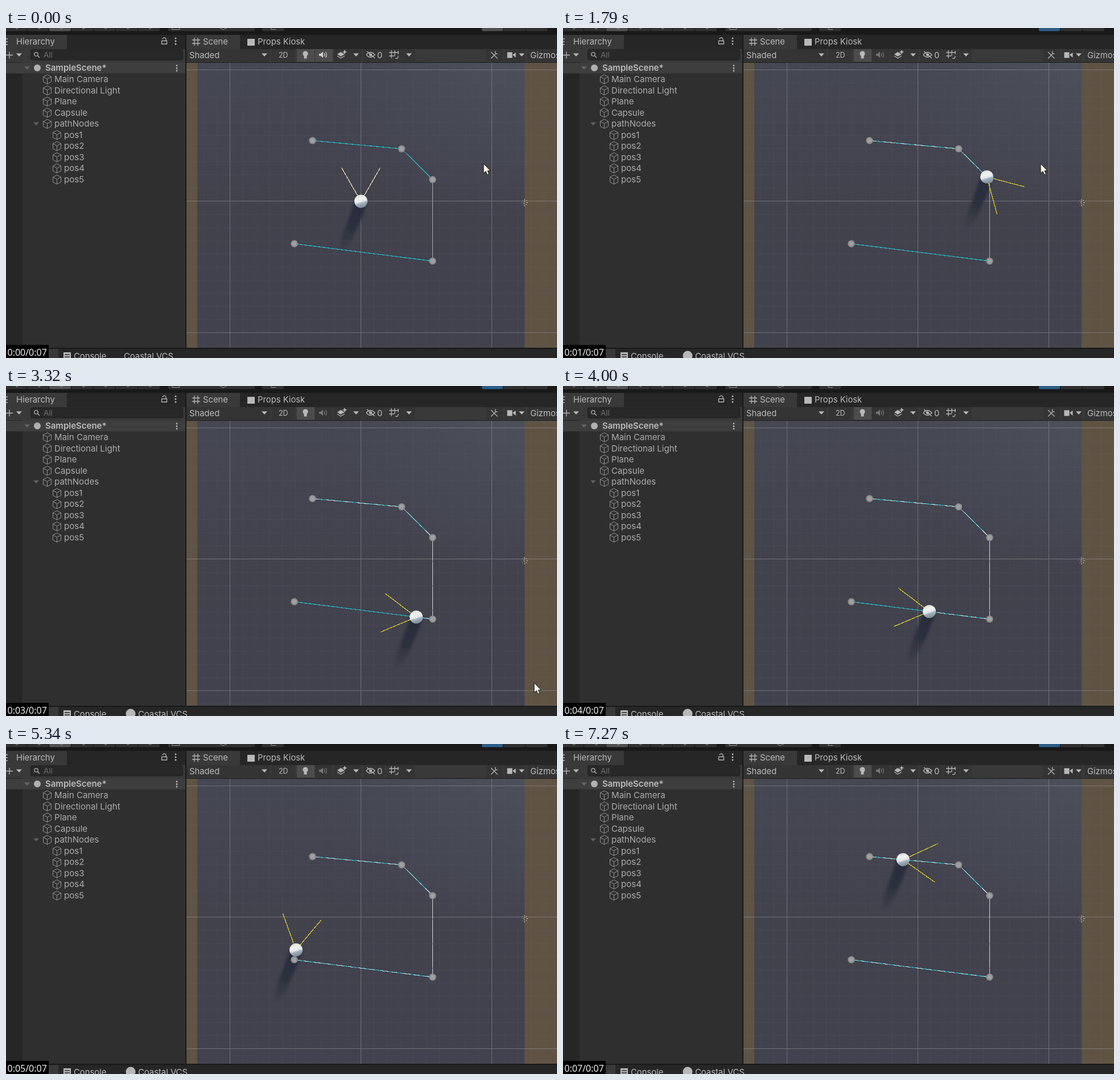
Animation, 968 px wide and 579 px high, one loop 7.33 s. Source, as an HTML page:

```html
<!DOCTYPE html>
<html lang="en">
<head>
<meta charset="utf-8">
<title>Path follower</title>
<style>
html, body { margin: 0; width: 100%; height: 100%; overflow: hidden; background: #191919; }
svg { display: block; }
text { font: 14.8px Inter, "Liberation Sans", sans-serif; fill: #bcbcbc; white-space: pre; }
.timer { font: 16px "Open Sans", "Noto Sans", sans-serif; fill: #fff; }
#tree text { font-size: 15.1px; fill: #acacac; }
.icon { fill: none; stroke: #b4b4b4; stroke-width: 1.3; }
.thin { fill: none; stroke: #929292; stroke-width: 1; }
.solid { fill: #b8b8b8; }
.crisp { shape-rendering: crispEdges; fill: none; }
</style>
</head>
<body>
<svg id="stage" width="968" height="579" viewBox="0 0 968 579">
  <defs>
    <linearGradient id="floor" x1="0" y1="0" x2="0" y2="1">
      <stop offset="0" stop-color="#454752"/>
      <stop offset=".5" stop-color="#42424d"/>
      <stop offset="1" stop-color="#41424d"/>
    </linearGradient>
    <radialGradient id="sheen" cx=".97" cy="0" r=".55">
      <stop offset="0" stop-color="#5a6672" stop-opacity=".28"/>
      <stop offset="1" stop-color="#5a6672" stop-opacity="0"/>
    </radialGradient>
    <linearGradient id="ball" x1=".35" y1="0" x2=".65" y2="1">
      <stop offset="0" stop-color="#dcdcd8"/>
      <stop offset=".3" stop-color="#f2f2ee"/>
      <stop offset=".52" stop-color="#e4e8ea"/>
      <stop offset=".66" stop-color="#9fb0bd"/>
      <stop offset="1" stop-color="#77858f"/>
    </linearGradient>
    <linearGradient id="shade" gradientUnits="userSpaceOnUse" x1="0" y1="0" x2="-37" y2="88">
      <stop offset="0" stop-color="#252a37" stop-opacity=".9"/>
      <stop offset=".55" stop-color="#282d3a" stop-opacity=".8"/>
      <stop offset="1" stop-color="#2e323f" stop-opacity=".2"/>
    </linearGradient>
    <filter id="soft" x="-50%" y="-30%" width="200%" height="160%"><feGaussianBlur stdDeviation="2"/></filter>
    <clipPath id="view"><rect x="317" y="61" width="651" height="500"/></clipPath>
    <path id="cube" class="thin" d="M0-8L7-4.4V4.4L0 8L-7 4.4V-4.4ZM-7-4.4L0-.6L7-4.4M0-.6V8"/>
    <path id="caret" d="M-5-2.5H5L0 3Z"/>
  </defs>

  <!-- top strip -->
  <g id="strip"></g>

  <!-- hierarchy panel -->
  <rect y="12" width="315" height="549" fill="#2f2f2f"/>
  <rect y="12" width="315" height="25" fill="#262626"/>
  <rect y="12" width="107" height="25" fill="#393939"/>
  <rect y="37" width="315" height="24" fill="#393939"/>
  <rect y="60" width="29" height="501" fill="#262626"/>
  <rect y="61" width="315" height="18.5" fill="#3e3e3e"/>
  <rect x="43.5" y="38" width="267" height="18" rx="3" fill="#282828" stroke="#1f1f1f"/>
  <path class="icon" d="M0 19H3M0 24H3M0 29H3"/>
  <text x="18" y="29">Hierarchy</text>
  <path class="icon" d="M273.500 22.500H282.500V28H273.500ZM274.500 19.500Q278 14.500 281 19V22"/>
  <g class="solid">
    <circle cx="298" cy="18" r="1.5"/><circle cx="298" cy="23" r="1.5"/><circle cx="298" cy="28" r="1.5"/>
    <circle cx="300" cy="66" r="1.4"/><circle cx="300" cy="70.500" r="1.4"/><circle cx="300" cy="75" r="1.4"/>
  </g>
  <path class="icon" d="M0 47.500H12M6 41.500V53.500"/>
  <use href="#caret" x="23" y="47" class="solid"/>
  <circle class="icon" cx="53" cy="46" r="3.2"/><path class="icon" d="M55.500 48.500L59 52"/>
  <text x="66" y="52" style="fill:#707070;font-size:13.500px">All</text>
  <use href="#caret" x="37" y="70" fill="#666"/>
  <circle cx="55" cy="70" r="6" fill="#b0b0b0"/>
  <text x="69" y="75" style="font-weight:600;font-size:15px">SampleScene*</text>
  <use href="#caret" x="53" y="168" fill="#606060"/>
  <g id="tree"></g>

  <!-- scene panel header -->
  <rect x="317" y="12" width="651" height="25" fill="#262626"/>
  <rect x="317" y="12" width="94" height="25" fill="#393939"/>
  <rect x="317" y="37" width="651" height="23" fill="#393939"/>
  <path class="icon" d="M331 17V31M337 17V31M327 21H341M327 27H341"/>
  <text x="346" y="29">Scene</text>
  <rect x="424" y="19" width="13" height="12" class="solid"/>
  <text x="442" y="29">Props Kiosk</text>
  <g id="buttons"></g>
  <text x="322" y="52.500">Shaded</text>
  <text x="479" y="52" style="font-size:12.500px">2D</text>
  <g class="solid">
    <use href="#caret" x="454" y="47"/><use href="#caret" x="615" y="47"/>
    <use href="#caret" x="708" y="47"/><use href="#caret" x="906" y="47"/>
    <circle cx="526" cy="45" r="4.600"/><rect x="523.500" y="48" width="5" height="5.500"/>
    <path d="M582 46L588 42L595 46L588 50Z"/><path d="M582 49L588 53L595 49" class="icon"/>
    <path d="M595 38L596.500 41L599.500 42L596.500 43L595 46L593.500 43L590.500 42L593.500 41Z"/>
    <rect x="880.500" y="42.500" width="9" height="10"/><path d="M890 47L895.500 43V52Z"/>
  </g>
  <g id="speaker">
    <path d="M550 45H553L557 41.500V52.500L553 49H550Z" fill="currentColor"/>
    <path d="M559 44Q561 47 559 50M561.500 42Q565 47 561.500 52" fill="none" stroke="currentColor" stroke-width="1.300"/>
  </g>
  <path class="icon" d="M633 47Q640 38.500 648 47Q640 55.500 633 47M634 41L648 53"/>
  <circle class="solid" cx="640.500" cy="47" r="2.500"/>
  <text x="652" y="52.500">0</text>
  <path class="icon" d="M677 39V53M683 39V49M673 43H690M673 49H682M689 40V46M684 53Q689 55 689 49"/>
  <path class="icon" d="M852 42L863.500 53.500M852 53.500L861 44.500M860 40.500Q858 45 863.500 45.500"/>
  <text x="921" y="52.500">Gizmos</text>

  <!-- scene view -->
  <g clip-path="url(#view)">
    <rect x="317" y="61" width="651" height="500" fill="#5f5344"/>
    <rect x="336" y="61" width="575" height="500" fill="url(#floor)"/>
    <rect x="336" y="61" width="575" height="500" fill="url(#sheen)"/>
    <path id="fine" class="crisp" stroke="#a0a4b0" stroke-opacity=".05"/>
    <path class="crisp" stroke="#a8a8a8" stroke-opacity=".42" d="M393.500 61V561M623.500 61V561M853.500 61V561M317 73.500H968M317 303.500H968M317 534.500H968"/>
    <g stroke="#c8bea2" fill="none">
      <path d="M911 304Q908.500 306.500 911 309M911 300V303M911 310V313M914 306.500H917M915 302L913.500 304M915 311L913.500 309"/>
      <path stroke-opacity=".4" d="M905 306.500H907M907 302L908.500 304M907 311L908.500 309"/>
    </g>
    <path id="shadow" fill="url(#shade)" filter="url(#soft)" d="M-10-3L10 4Q2 30-12 58Q-23 84-35 88Q-40 84-33 62Q-21 29-10-3Z"/>
    <g id="links" class="crisp"></g>
    <g id="nodes"></g>
    <path id="cone" class="crisp" stroke-width="1.200"/>
    <circle id="capsule" r="11.500" fill="url(#ball)"/>
  </g>

  <!-- bottom tabs -->
  <rect y="561" width="968" height="2" fill="#191919"/>
  <rect y="563" width="968" height="16" fill="#262626"/>
  <rect y="563" width="92" height="16" fill="#393939"/>
  <rect x="101" y="569" width="13" height="11" class="solid"/>
  <path d="M103 573H112M103 577H112" stroke="#262626" stroke-width="1.500"/>
  <text x="119" y="580.500">Console</text>
  <circle id="mark" cx="219" cy="575" r="8.500" class="solid"/>
  <text id="vcs" y="580.500">Coastal VCS</text>
  <rect y="556" width="75" height="23" fill="#000"/>
  <text id="timer" class="timer" x="2.500" y="574.500"></text>

  <path id="cursor" d="M0 0V17L4 13.500L6.500 19.500L9.500 18L7 12.500H12Z" stroke="#111" stroke-width="1"/>
</svg>
<script>
const $ = id => document.getElementById(id);
const LOOP = 7330, STEP = LOOP / 110, SPEED = 0.1167;
const nodes = [[538.5, 197.5], [695, 212], [749.5, 266], [749.5, 409], [506.5, 378.5]];

function add(parent, tag, attrs, text) {
  const el = document.createElementNS("http://www.w3.org/2000/svg", tag);
  for (const key in attrs) el.setAttribute(key, attrs[key]);
  if (text) el.textContent = text;
  return $(parent).appendChild(el);
}

// Toolbar pieces
const bar = (x, w, fill) => add("strip", "rect", { x, y: -3, width: w, height: 8.5, rx: 2, fill });
for (let i = 0; i < 7; i++) {
  bar(i * 39 - 2, 38, i === 2 ? "#515151" : "#313131");
  add("strip", "path", { d: `M${i * 39 + 15} -2L${i * 39 + 19} 2L${i * 39 + 24} -2`, class: "thin" });
}
bar(285, 152, "#313131");
bar(450, 38, "#313131");
add("strip", "path", { d: "M292 0V2.5H305V0M376 0L381 3L388 0M466 0V2.5H474", class: "thin" });
const play = bar(836, 37, "#515151");
bar(874, 38, "#313131");
bar(913, 38, "#313131");

const button = (x, width, fill = "#343434") =>
  add("buttons", "rect", { x, y: 37, width, height: 22, fill });
[[317, 146], [466, 41], [576, 29], [606, 18], [628, 38], [668, 29], [698, 20], [843, 30], [876, 36], [916, 60]]
  .forEach(([x, width]) => button(x, width));
button(511, 31, "#4c4c4c");
const sound = button(543, 31);

["Main Camera", "Directional Light", "Plane", "Capsule", "pathNodes", "pos1", "pos2", "pos3", "pos4", "pos5"]
  .forEach((name, i) => {
    const y = 90 + i * 19.55, x = i > 4 ? 89 : 72;
    add("tree", "use", { href: "#cube", x: x + 0.5, y });
    add("tree", "text", { x: x + 13, y: y + 5 }, name);
  });

// Fine grid
let grid = "";
for (let i = -3; i < 26; i++) {
  grid += `M${Math.round(393 + i * 23) + 0.5} 61V561`;
  if (i > -1) grid += `M317 ${Math.round(73 + i * 23.05) + 0.5}H968`;
}
$("fine").setAttribute("d", grid);

// Path, with a pale trail over each travelled link
const dashes = ["13 11 22 8", "38 6 5 9", "40 3", "15 9 9 6"];
let total = 0;
const links = nodes.map((a, i) => {
  const b = nodes[(i + 1) % nodes.length];
  const dx = b[0] - a[0], dy = b[1] - a[1];
  const link = { a, dx, dy, start: total, len: Math.hypot(dx, dy) };
  total += link.len;
  if (i < 4) {
    const ends = { x1: a[0], y1: a[1], x2: b[0], y2: b[1] };
    add("links", "line", { ...ends, stroke: i === 2 ? "#a5a9ad" : "#26b4be", "stroke-width": i === 2 ? 1 : 1.3 });
    link.trail = add("links", "line", { ...ends, stroke: "#d6e4e4", "stroke-opacity": 0.85, "stroke-dasharray": dashes[i] });
  }
  return link;
});
nodes.forEach(([cx, cy]) => {
  add("nodes", "circle", { cx, cy, r: 6.2, fill: "#8c8c8e" });
  add("nodes", "circle", { cx, cy, r: 4, fill: "#a0a09f" });
});

const pointer = [[2480, 839, 238], [2800, 875, 270], [3132, 922, 354], [3332, 928, 521], [3530, 934, 582]];

function pointerAt(t) {
  let i = 0;
  while (i < pointer.length - 2 && t > pointer[i + 1][0]) i++;
  const [t0, x0, y0] = pointer[i], [t1, x1, y1] = pointer[i + 1];
  const k = Math.min(1, Math.max(0, (t - t0) / (t1 - t0)));
  return [x0 + (x1 - x0) * k, y0 + (y1 - y0) * k];
}

const move = (id, x, y) => $(id).setAttribute("transform", `translate(${x} ${y})`);

function draw(time) {
  // Steps fall on 10 ms ticks, so allow for the rounding
  const step = Math.min(109, Math.floor((time % LOOP + 16) / STEP));
  const t = step * STEP, playing = step > 0;
  const travelled = 141.5 + SPEED * (t - 16 * STEP);
  let x = 623.5, y = 304, heading = -Math.PI / 2;

  if (playing) {
    const s = travelled % total;
    const link = links.find(l => s < l.start + l.len);
    const k = (s - link.start) / link.len;
    x = link.a[0] + link.dx * k;
    y = link.a[1] + link.dy * k;
    heading = Math.atan2(link.dy, link.dx);
  }
  for (const { trail, a, dx, dy, start, len } of links) {
    if (!trail) continue;
    const k = playing ? Math.min(1, Math.max(0, (travelled - start) / len)) : 0;
    trail.setAttribute("x2", a[0] + dx * k);
    trail.setAttribute("y2", a[1] + dy * k);
    trail.style.display = k ? "" : "none";
  }
  const ray = side => {
    const angle = heading + side * Math.PI / 6;
    return `M${x} ${y}L${x + 68.3 * Math.cos(angle)} ${y + 68.3 * Math.sin(angle)}`;
  };
  $("cone").setAttribute("d", ray(-1) + ray(1));
  $("cone").setAttribute("stroke", playing ? "#e3d321" : "#e9e2b0");
  move("capsule", x, y);
  move("shadow", x, y);

  play.setAttribute("fill", playing ? "#2c5d87" : "#515151");
  sound.setAttribute("fill", playing ? "#343434" : "#4c4c4c");
  $("speaker").style.color = playing ? "#747474" : "#d0d0d0";
  $("mark").style.display = playing ? "" : "none";
  $("vcs").setAttribute("x", playing ? 232 : 207);
  $("timer").textContent = `0:0${Math.floor((t + 10) / 1000)}/0:07`;
  move("cursor", ...pointerAt(t));
  $("cursor").setAttribute("fill", t < 2480 ? "#fbf7e2" : "#fff");
}

const begin = performance.now();
function tick() {
  draw(performance.now() - begin);
  requestAnimationFrame(tick);
}
tick();
</script>
</body>
</html>
```
